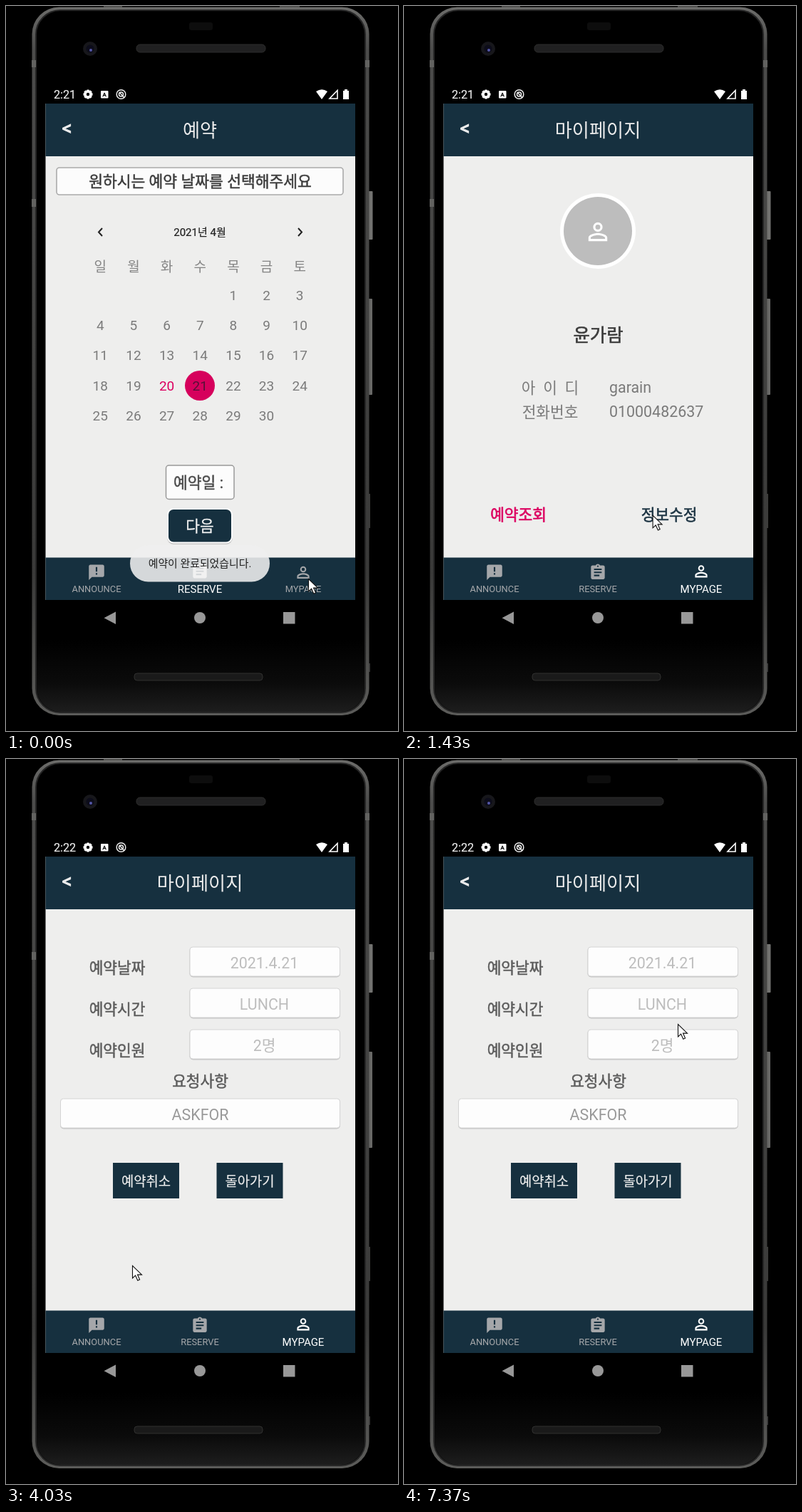
Write an HTML page that moves like this. It is 550 px wide and 1018 px high and loops after 8 s.

```html
<!DOCTYPE html>
<html lang="ko">
<head>
<meta charset="utf-8">
<title>Reservation app</title>
<style>
  html, body { margin: 0; width: 100%; height: 100%; overflow: hidden; background: #000; }
  svg { display: block; width: 550px; height: 1018px; }
  text { font-family: Roboto, 'Noto Sans CJK KR', 'Noto Sans CJK', sans-serif; white-space: pre; }
</style>
</head>
<body>
<svg id="stage" viewBox="0 0 550 1018"></svg>
<script>
const LOOP = 8000, NAVY = '#16303f', PINK = '#dc0060', PAGE = '#eeeeed';
const $ = id => document.getElementById(id);

const icons = {
  announce: 'M20 2H4c-1.1 0-2 .9-2 2v18l4-4h14c1.1 0 2-.9 2-2V4c0-1.1-.9-2-2-2zm-7 9h-2V5h2v6zm0 4h-2v-2h2v2z',
  reserve: 'M19 3h-4.2C14.4 1.8 13.3 1 12 1s-2.4.8-2.8 2H5c-1.1 0-2 .9-2 2v14c0 1.1.9 2 2 2h14c1.1 0 2-.9 2-2V5c0-1.1-.9-2-2-2zm-7 0a1 1 0 1 1 0 2 1 1 0 0 1 0-2zm2 14H7v-2h7v2zm3-4H7v-2h10v2zm0-4H7V7h10v2z',
  person: 'M12 5.9a2.1 2.1 0 1 1 0 4.2 2.1 2.1 0 0 1 0-4.2m0 9c3 0 6.1 1.5 6.1 2.1v1.1H5.9V17c0-.6 3.1-2.1 6.1-2.1M12 4a4 4 0 1 0 0 8 4 4 0 0 0 0-8zm0 9c-2.7 0-8 1.3-8 4v3h16v-3c0-2.7-5.3-4-8-4z'
};

// Text centred vertically on y; bold is the fill thickened by a thin stroke.
function text(x, y, str, size, fill, { bold = 0, anchor = 'middle', attr = '' } = {}) {
  const base = y + size * (/[가-힣]/.test(str) ? .375 : .355);
  return `<text x="${x}" y="${base}" font-size="${size}" fill="${fill}" stroke="${fill}"
    stroke-width="${bold}" text-anchor="${anchor}" ${attr}>${str}</text>`;
}
const rect = (x1, y1, x2, y2, fill, r = 0, attr = '') =>
  `<rect x="${x1}" y="${y1}" width="${x2 - x1}" height="${y2 - y1}" rx="${r}" fill="${fill}" ${attr}/>`;
const circle = (x, y, r, fill, attr = '') => `<circle cx="${x}" cy="${y}" r="${r}" fill="${fill}" ${attr}/>`;
const path = (d, fill, attr = '') => `<path d="${d}" fill="${fill}" ${attr}/>`;
const icon = (name, x, y, scale, fill) =>
  path(icons[name], fill, `transform="translate(${x} ${y}) scale(${scale}) translate(-12 -12)"`);
const group = (id, body) => `<g id="${id}">${body}</g>`;

function phone() {
  return `<defs>
    <linearGradient id="chin" x2="0" y2="1"><stop stop-color="#000"/><stop offset=".6" stop-color="#0b0b0b"/><stop offset="1" stop-color="#1d1d1d"/></linearGradient>
    <linearGradient id="rim" x2="0" y2="1"><stop stop-color="#6c6c6a"/><stop offset=".06" stop-color="#4c4c4b"/><stop offset=".8" stop-color="#3a3a39"/><stop offset="1" stop-color="#5c5c5a"/></linearGradient>
    </defs>`
    + rect(508, 260, 514.5, 328, '#727270', 1) + rect(508, 411, 514, 546, '#686866', 1)
    + rect(508, 685, 511, 733, '#3c3c3b') + rect(508, 923, 511, 935, '#333')
    + rect(137, 0, 163, 4, '#4a4a48') + rect(384, 0, 412, 4, '#4a4a48')
    + rect(36.500, 1.500, 509.500, 996, 'url(#rim)', 38)
    + rect(42, 6, 504, 992, '#000', 34, 'stroke="#262626" stroke-width="2"')
    + path('M43 890H503V957A34 34 0 0 1 469 991H77A34 34 0 0 1 43 957Z', 'url(#chin)')
    + rect(36, 76, 42, 86, '#626260') + rect(36, 271, 42, 282, '#626260') + rect(504, 76, 510, 86, '#626260')
    + rect(257, 23, 290, 34, '#0d0d0d', 3)
    + rect(183, 54, 364, 65, '#202021', 5, 'stroke="#2d2d2c"')
    + circle(118, 60, 10, '#17171b') + circle(118, 60, 5.5, '#0c0c1a') + circle(119, 62, 2, '#5558a8')
    + rect(180, 937, 360, 947, '#1a1a1a', 4, 'stroke="#30302f"');
}

function statusBar() {
  const teeth = [0, 45, 90, 135].map(a => rect(113, 117.5, 117, 130.5, '#fff', 1, `transform="rotate(${a} 115 124)"`)).join('');
  return text(67, 124.5, '2:21', 16.2, '#eee', { bold: .2, anchor: 'start', attr: 'id="clock"' })
    + teeth + circle(115, 124, 4.8, '#fff') + circle(115, 124, 2.2, '#000')
    + rect(133, 119, 143.5, 129.5, '#fff', 1) + text(138.2, 124.4, 'A', 8, '#000', { bold: .4 })
    + circle(161.5, 124, 6.3, 'none', 'stroke="#eee" stroke-width="1.5"')
    + circle(161.5, 124, 3, 'none', 'stroke="#eee" stroke-width="1.5"')
    + path('M159 121L166 129', 'none', 'stroke="#eee" stroke-width="1.5"')
    + path('M435 120Q443.200 114.500 451 120L443 131Z', '#fff')
    + path('M465 118.500V130H454Z', 'none', 'stroke="#fff" stroke-width="1.6"')
    + path('M473 119H475V117H479V119H481V131H473Z', '#fff');
}

function bookingPage() {
  const dayX = i => 132.3 + 46.65 * i;
  let s = rect(71, 227, 473, 265, '#fcfcfc', 4, 'stroke="#aaa" stroke-width="1.6"')
    + text(272.5, 246, '원하시는 예약 날짜를 선택해주세요', 21.5, '#3c3c3c', { bold: .5 })
    + text(272, 317.5, '2021년 4월', 15, '#222', { bold: .2 })
    + path('M135 312L130 317.500L135 323M410 312L415 317.500L410 323', 'none', 'stroke="#222" stroke-width="2"')
    + circle(272, 533, 21, '#d6005c');
  [...'일월화수목금토'].forEach((d, i) => s += text(dayX(i), 366, d, 19, '#858585'));
  for (let d = 1; d <= 30; d++) {
    const cell = d + 3;
    s += text(dayX(cell % 7), 406.3 + 42.2 * Math.floor(cell / 7), d, 19,
      d === 20 ? PINK : d === 21 ? '#571038' : '#7b7b7b');
  }
  return s + rect(224.500, 645, 320, 692.500, '#fcfcfc', 4, 'stroke="#999" stroke-width="1.5"')
    + text(270, 669, '예약일 :', 21.5, '#4a4a4a', { bold: .5 })
    + rect(226, 706, 318, 756, '#c6c6c6', 9) + rect(226, 705, 318, 754.500, '#fff', 9)
    + rect(228, 707, 316, 752.500, NAVY, 7)
    + text(272, 730, '다음', 21.4, '#f2f2f2', { bold: .3 });
}

function profilePage() {
  const left = { anchor: 'start' };
  return circle(272, 316, 53, '#fff') + circle(272, 316, 48, '#bdbdbd')
    + icon('person', 272, 317, 1.65, '#fff')
    + text(272.500, 461, '윤가람', 25.4, '#3a3a3a', { bold: .6 })
    + text(205, 535.500, '아  이  디', 21.4, '#7a7a7a') + text(205, 569.500, '전화번호', 21.4, '#7a7a7a')
    + text(288, 535.500, 'garain', 21.4, '#7a7a7a', left)
    + text(288, 569.500, '01000482637', 21.4, '#7a7a7a', left)
    + text(160.500, 714, '예약조회', 21.4, PINK, { bold: .7 })
    + text(372, 714, '정보수정', 21.4, '#1d3443', { bold: .6 });
}

function detailPage() {
  const field = (x, y, cx, str, fill) =>
    rect(x - .5, y, 469, y + 42.500, '#c4c4c4', 5) + rect(x, y, 468.500, y + 41, '#fdfdfd', 4, 'stroke="#d4d4d4"')
    + text(cx, y + 22, str, 21.4, fill);
  const label = (x, y, str) => text(x, y, str, 21.4, '#5c5c5c', { bold: .5 });
  const button = (x, str) => rect(x, 567, x + 93, 617, NAVY) + text(x + 46.500, 592.500, str, 18.8, '#eee', { bold: .2 });
  return label(156, 292.500, '예약날짜') + label(156, 350.500, '예약시간') + label(156, 408.500, '예약인원')
    + label(272.500, 452, '요청사항')
    + field(258, 264, 362.500, '2021.4.21', '#bdbdbd') + field(258, 322, 362.500, 'LUNCH', '#bdbdbd')
    + field(258, 380, 362.500, '2명', '#bdbdbd') + field(76.500, 477, 272.500, 'ASKFOR', '#999')
    + button(150, '예약취소') + button(295.500, '돌아가기');
}

function tabs(selected) {
  return [['announce', 'ANNOUNCE', 127], ['reserve', 'RESERVE', 272], ['person', 'MYPAGE', 417]]
    .map(([name, label, x], i) => {
      const on = selected[i], c = 165 + 90 * on, fill = `rgb(${c},${c + 2 * (1 - on)},${c + 5 * (1 - on)})`;
      return icon(name, x, 795.3 - 1.5 * on, 1.075, fill) + text(x, 818.6 - .4 * on, label, 12.9 + 2.1 * on, fill);
    }).join('');
}

$('stage').innerHTML = phone() + statusBar()
  + rect(55.500, 137, 490, 834, PAGE) + rect(55.500, 137, 490, 211, NAVY)
  + text(78.500, 171, '&lt;', 28, '#eee', { bold: .9, anchor: 'start' })
  + text(272, 174.500, '예약', 26.2, '#ececec', { attr: 'id="title"' })
  + group('booking', bookingPage()) + group('profile', profilePage()) + group('detail', detailPage())
  + rect(55.500, 774.500, 490, 834, NAVY) + group('tabs', '')
  + group('toast', rect(174, 757, 370, 808.500, '#f0f0f0', 25.5, 'opacity=".88"')
    + text(272, 782.500, '예약이 완료되었습니다.', 14.9, '#222'))
  + path('M154 850.500V868L137.500 859.200Z', '#989898') + circle(272, 859, 8, '#989898') + rect(389, 851, 405.500, 867.500, '#989898')
  + group('cursor', path('M.5 .5V18L4.600 14.200L7.800 21.300L10.600 20L7.500 13.100H13.500Z', '#fff', 'stroke="#111" stroke-width="1.1"'));

// Pointer route: time, x, y
const route = [
  [0, 424, 804], [1100, 424, 804], [1430, 349, 715], [1600, 245, 702], [1770, 177, 711],
  [5300, 177, 711], [5570, 254, 520], [5850, 315, 390], [6100, 345, 300], [6300, 425, 290],
  [6500, 400, 410], [6700, 300, 410], [6930, 384, 372], [LOOP, 384, 372]
];

function slope(i, k) {
  const a = route[i - 1], b = route[i], c = route[i + 1];
  if (!a || !c || (a[1] === b[1] && a[2] === b[2]) || (b[1] === c[1] && b[2] === c[2])) return 0;
  return (c[k] - a[k]) / (c[0] - a[0]);
}

function pointer(t) {
  const i = Math.max(0, route.findIndex(p => p[0] > t) - 1);
  const a = route[i], b = route[i + 1], span = b[0] - a[0], u = (t - a[0]) / span, v = 1 - u;
  return [1, 2].map(k => v * v * (1 + 2 * u) * a[k] + u * u * (3 - 2 * u) * b[k]
    + span * u * v * (v * slope(i, k) - u * slope(i + 1, k)));
}

const ramp = (t, from, to) => Math.min(1, Math.max(0, (t - from) / (to - from)));

function draw(t) {
  const page = t < 300 ? 'booking' : t < 3370 ? 'profile' : 'detail';
  for (const id of ['booking', 'profile', 'detail']) $(id).style.display = id === page ? '' : 'none';
  $('title').textContent = page === 'booking' ? '예약' : '마이페이지';
  $('clock').textContent = t < 4000 ? '2:21' : '2:22';
  const on = ramp(t, 270, 390);
  $('tabs').innerHTML = tabs([0, 1 - on, on]);
  $('toast').setAttribute('opacity', 1 - ramp(t, 860, 1260));
  $('cursor').setAttribute('transform', `translate(${pointer(t).map(n => n.toFixed(1))})`);
}

function tick() {
  draw(performance.now() % LOOP);
  requestAnimationFrame(tick);
}
tick();
</script>
</body>
</html>
```
